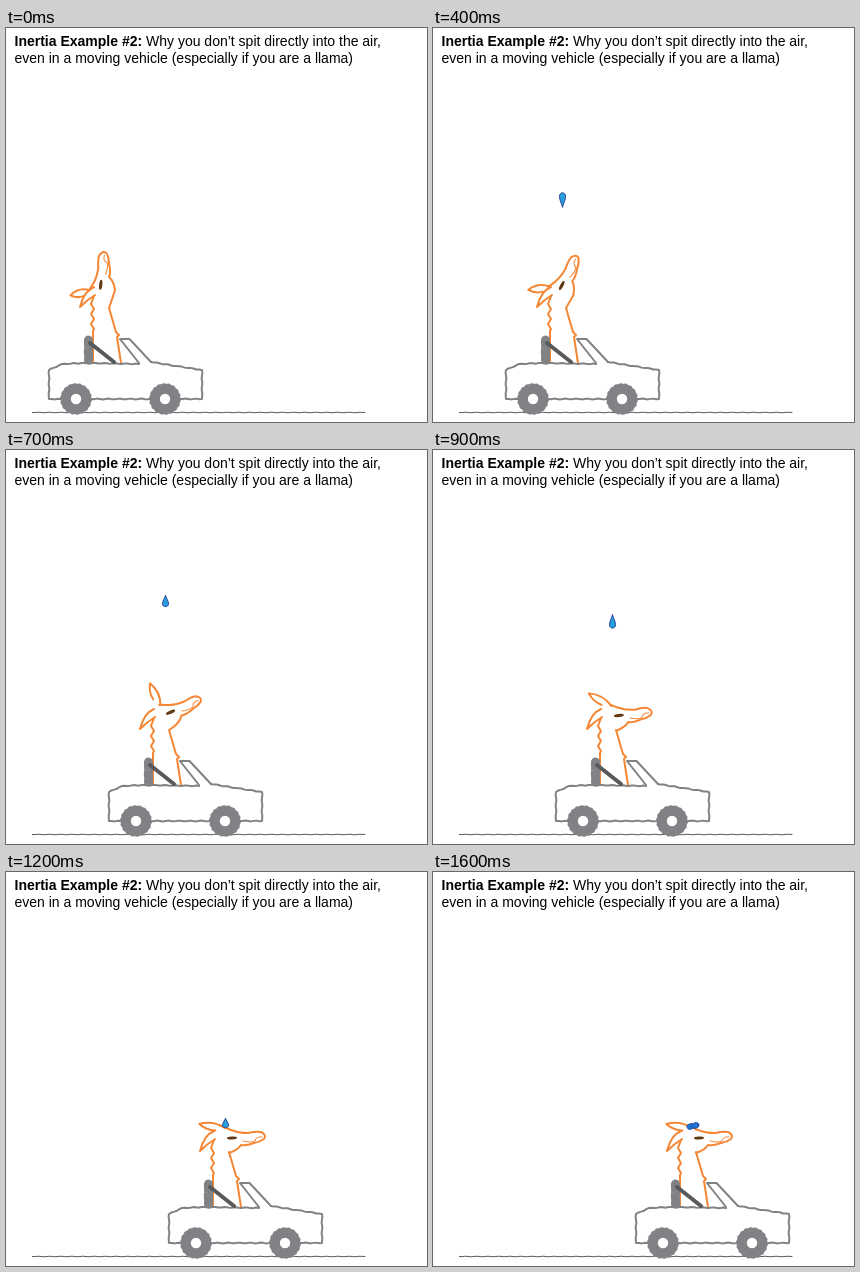
Write an HTML page with a canvas that moves like this. It is 421 px wide and 394 px high and loops after 2.1 s.

```html
<!DOCTYPE html>
<html lang="en">
<head>
<meta charset="utf-8">
<title>Inertia Example #2</title>
<style>
  html, body { margin: 0; width: 100%; height: 100%; overflow: hidden; background: #fff; }
  canvas { position: absolute; left: 0; top: 0; width: 421px; height: 394px; }
  p { position: absolute; left: 8.5px; top: 5px; margin: 0; white-space: nowrap;
      font: 14px/17px "Liberation Sans", Arial, sans-serif; color: #000; }
</style>
</head>
<body>
<canvas></canvas>
<p><b>Inertia Example #2:</b> Why you don’t spit directly into the air,<br>even in a moving vehicle (especially if you are a llama)</p>
<script>
const W = 421, H = 394, LOOP = 2100;
const ORANGE = '#f58634', GREY = '#808285', DARK = '#58595b', INK = '#21409a';
const PIVOT = [95, 268];
const canvas = document.querySelector('canvas');
const g = canvas.getContext('2d');
const dpr = window.devicePixelRatio || 1;
canvas.width = W * dpr;
canvas.height = H * dpr;

// Head shapes are relative to the pivot, looking ahead.
const head = new Path2D('M3-13L10-10Q17-7 27-7Q36-9 40-8Q46-5 43-1Q39 2 33 3Q25 6 20 5Q17 10 8 13');
const mouth = new Path2D('M41-3Q35-4 34 1Q29 3 22 1');
const lowEar = new Path2D('M88 259Q78 263 74 279Q81 272 89 267');
const windshield = new Path2D('M133 335L114 311H123.5L145 334');
const drop = new Path2D('M0-1C.3-.5 1 0 1 .5C1 1.2-1 1.2-1 .5C-1 0-.3-.5 0-1Z');

function stroke(color, width, path) {
  g.strokeStyle = color;
  g.lineWidth = width;
  path ? g.stroke(path) : g.stroke();
}

function poly(points, color, width) {
  g.beginPath();
  for (const [x, y] of points) g.lineTo(x, y);
  stroke(color, width);
}

// Polyline with a hand-drawn wobble.
function rough(points, color, width, amp = 0.4) {
  const out = [points[0]];
  for (let i = 1; i < points.length; i++) {
    const [x, y] = points[i - 1];
    const dx = points[i][0] - x, dy = points[i][1] - y;
    const len = Math.hypot(dx, dy), parts = Math.ceil(len / 3);
    for (let s = 1; s < parts; s++) {
      const o = amp * Math.sin(s * 1.7 + i) / len, f = s / parts;
      out.push([x + dx * f - dy * o, y + dy * f + dx * o]);
    }
    out.push(points[i]);
  }
  poly(out, color, width);
}

function oval(x, y, rx, ry, color, tilt = 0) {
  g.beginPath();
  g.ellipse(x, y, rx, ry, tilt, 0, 7);
  g.fillStyle = color;
  g.fill();
}

function llama(n) {
  const p = Math.min(1, n / 9), ease = p * p * (3 - 2 * p);
  const angle = (ease - 1) * 81 * Math.PI / 180;
  const cos = Math.cos(angle), sin = Math.sin(angle);
  const turn = (x, y) => [PIVOT[0] + x * cos - y * sin, PIVOT[1] + x * sin + y * cos];

  g.save();
  g.translate(...PIVOT);
  g.rotate(angle);
  stroke(ORANGE, 2, head);
  stroke(ORANGE, 1, mouth);
  oval(11, -2, 5, 1.6, '#603913', -0.04);
  g.restore();

  // The upper ear flies up while the head comes down.
  const flap = Math.max(0, 1 - Math.abs(n - 6) / 3);
  const len = 20 + 6 * ease;
  g.save();
  g.translate(...turn(4, -12));
  g.rotate((24 * ease - 15 + 62 * flap) * Math.PI / 180);
  g.beginPath();
  g.moveTo(0, 0);
  g.quadraticCurveTo(-len / 2, -6, -len, 0);
  g.quadraticCurveTo(-len * 0.7, 5, -len * 0.35, 4);
  stroke(ORANGE, 2);
  g.restore();
  stroke(ORANGE, 2, lowEar);

  const nape = [[88, 268]];
  for (let i = 0; i < 6; i++) nape.push([i % 2 ? 88 : 85, 276 + i * 5]);
  poly([...nape, [87, 303], [87, 335]], ORANGE, 2);
  poly([turn(8, 13), [103, 280], [110, 304], [113, 307], [111, 309], [115, 335]], ORANGE, 2);
}

function wheel(x) {
  const y = 371;
  g.beginPath();
  for (let a = 0; a < 2 * Math.PI; a += Math.PI / 60) {
    const r = 15.6 + 0.35 * Math.sin(a * 18);
    g.lineTo(x + r * Math.cos(a), y + r * Math.sin(a));
  }
  g.fillStyle = GREY;
  g.fill();
  oval(x, y, 5.2, 5.2, '#fff');
}

function car() {
  rough([[82.5, 312], [82.5, 332]], GREY, 9, 0.2);
  rough([[55, 371], [43, 371], [43, 342], [56, 336], [78, 335], [133, 336]], GREY, 2);
  stroke(GREY, 2, windshield);
  rough([[145, 334], [170, 338], [196, 342], [196, 371], [174, 371]], GREY, 2);
  rough([[85, 371], [144, 371]], GREY, 2);
  poly([[84, 315], [108, 334]], DARK, 4);
  wheel(70);
  wheel(159);
}

function spit(n) {
  if (n < 1) return;
  if (n > 12) {
    for (const side of [-1, 1]) {
      oval(100 + side * 2.5, 254 - side * 0.5, 3.6, 2.8, '#1c75d0', -0.3);
      stroke(INK, 0.8);
    }
    return;
  }
  const d = n - 6;
  const y = Math.min(251, 151 + 3.44 * d * d + 3.33 * d);
  const h = n > 11 ? 4.5 : Math.min(7, 5.5 + Math.abs(d) * 0.5);
  g.save();
  g.translate(99.5, y);
  g.scale(3, n < 5 ? -h : h);
  g.fillStyle = '#27a0dc';
  g.fill(drop);
  const shape = new Path2D();
  shape.addPath(drop, new DOMMatrix([3, 0, 0, n < 5 ? -h : h, 99.5, y]));
  g.restore();
  stroke(INK, 1, shape);
}

function draw(now) {
  const step = Math.min(15, Math.max(0, Math.floor(now % LOOP / 100) - 1));
  const n = step > 10 ? step + 1 : step;
  g.setTransform(dpr, 0, 0, dpr, 0, 0);
  g.clearRect(0, 0, W, H);
  g.lineJoin = g.lineCap = 'round';
  rough([[26, 384.5], [359, 384.5]], DARK, 1, 0.3);
  g.translate(n * 10, 0);
  llama(n);
  car();
  spit(n);
}

let start;
function tick(now) {
  start ??= now;
  draw(now - start);
  requestAnimationFrame(tick);
}
draw(0);
requestAnimationFrame(tick);
</script>
</body>
</html>
```
